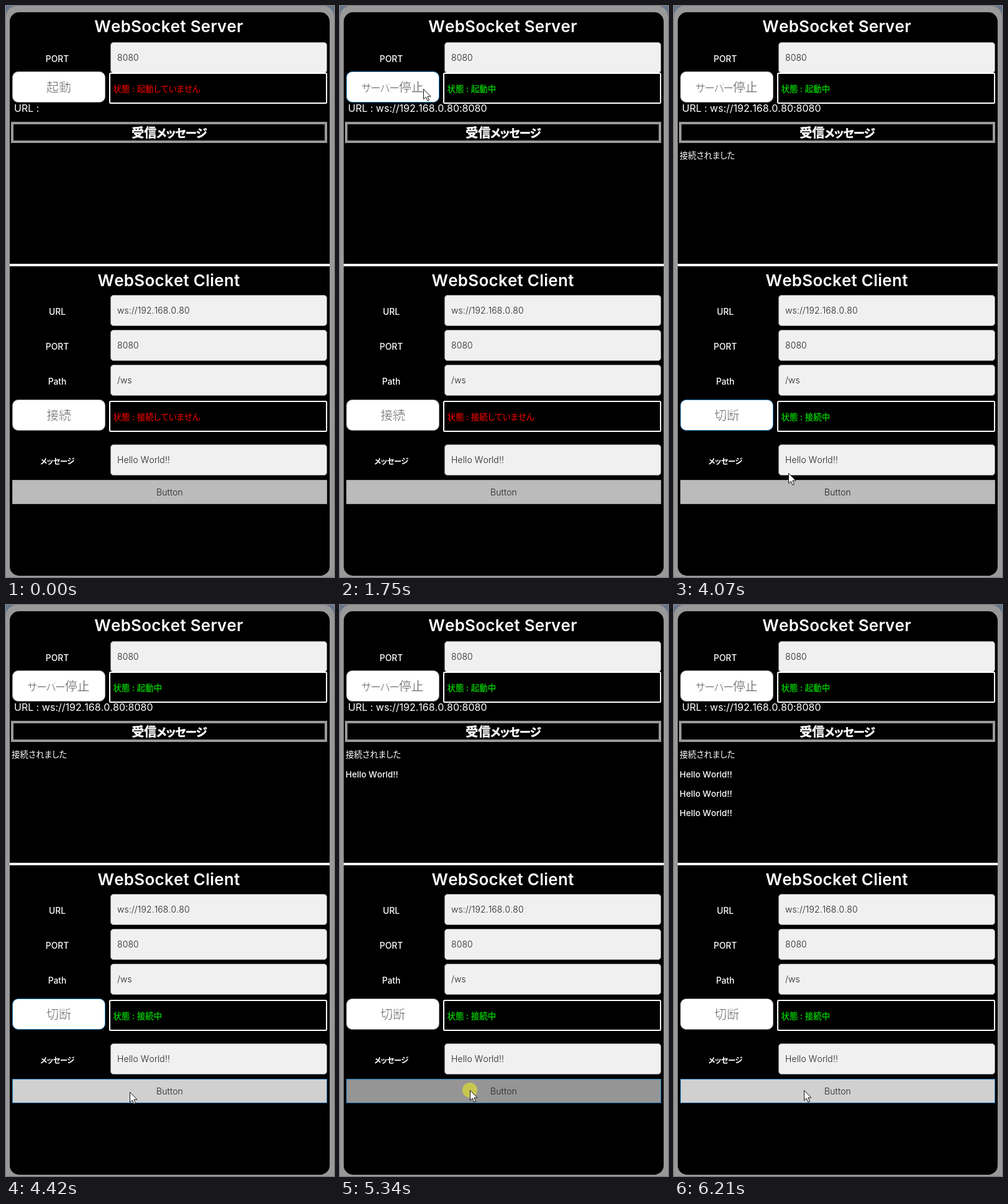
An HTML page that plays this animation: 528x917 px, repeating every 6.94 s.

```html
<!DOCTYPE html>
<html lang="ja">
<head>
<meta charset="utf-8">
<title>WebSocket demo</title>
<style>
html, body { margin: 0; width: 100%; height: 100%; overflow: hidden; background: #64748b; }
svg { display: block; width: 528px; height: 917px; }
text { font: 500 13.8px Inter, 'Noto Sans CJK JP', 'Noto Sans CJK', sans-serif; fill: #fff;
  font-kerning: none; font-variant-ligatures: none; white-space: pre; }
.mid { text-anchor: middle; }
.title { font-size: 26px; font-weight: 600; letter-spacing: .25px; }
.head { font-size: 20px; font-weight: 800; stroke: #fff; stroke-width: .5px; }
.big { font-size: 20px; font-weight: 200; fill: #444; stroke: #fff; stroke-width: .7px; }
.field { font-size: 14px; font-weight: 300; fill: #222; letter-spacing: .1px; }
.url { font-size: 16px; font-weight: 400; }
.log { font-size: 13.7px; }
.jp { font-size: 13.5px; font-weight: 400; }
.bold { font-size: 13.5px; font-weight: 700; }
.bad { font-size: 13.5px; fill: #d80000; }
.good { font-size: 13.5px; fill: #00d800; }
.bad, .good { stroke: currentColor; stroke-width: .25px; }
.bad { color: #d80000; }
.good { color: #00d800; }
.hira, .kata { font-feature-settings: 'palt'; }
.kata { font-size: .92em; letter-spacing: -.05em; }
.big .kata { font-size: .85em; letter-spacing: -1.3px; }
</style>
</head>
<body>
<svg id="stage" viewBox="0 0 528 917">
  <rect width="528" height="960" rx="17" fill="#999"/>
  <rect x="6" y="10" width="515" height="905" rx="15"/>
  <rect x="6" y="414" width="515" height="4" fill="#fff"/>
  <rect x="10" y="188" width="505" height="30" fill="none" stroke="#999" stroke-width="4"/>
  <g id="ui"></g>
  <circle id="halo" r="12" fill="#eaea21" opacity=".6"/>
  <path id="cursor" d="M0 0V16.2L3.8 12.7L6.4 18.8L9 17.7L6.4 11.7H11.4Z" fill="#fff" stroke="#111" stroke-width="1"/>
</svg>
<script>
const LOOP = 6940, BLUE = '#1f7fc0';
const $ = id => document.getElementById(id);
const ui = $('ui');
const timed = [];

function add(tag, attrs, html = '') {
  const el = document.createElementNS('http://www.w3.org/2000/svg', tag);
  for (const key in attrs) el.setAttribute(key, attrs[key]);
  el.innerHTML = html;
  return ui.appendChild(el);
}

// Text shown from one time up to another
function label(str, x, y, cls, from = 0, to = LOOP) {
  const html = str.replace(/[ぁ-ん]+|[ァ-ヶー]+/g,
    kana => `<tspan class="${kana < 'ァ' ? 'hira' : 'kata'}">${kana}</tspan>`);
  const el = add('text', { x, y, class: cls }, html);
  if (from > 0 || to < LOOP) timed.push({ el, from, to });
}

const box = (x, y, width, height, rx, fill, stroke = 'none', w = 1) =>
  add('rect', { x, y, width, height, rx, fill, stroke, 'stroke-width': w });

function field(y, value) {
  box(168.5, y + .5, 348, 49, 4.5, '#f0f0f0', '#888');
  label(value, 179, y + 30, 'field');
}

const button = y => box(10.5, y + .5, 149, 49, 9, '#fff', '#999');
const status = y => box(167, y, 349, 48, 1.5, '#000', '#fff', 2);

label('WebSocket Server', 262, 42, 'title mid');
label('PORT', 82.5, 90, 'mid');
field(58, '8080');
const serverButton = button(105);
label('起動', 85, 138, 'big mid', 0, 1750);
label('サーバー停止', 84.5, 138, 'big mid', 1750);
status(108);
label('状態 : 起動していません', 172.5, 137.5, 'bad', 0, 1750);
label('状態 : 起動中', 172.5, 137.5, 'good', 1750);
label('URL : ', 13, 170, 'url', 0, 1750);
label('URL : ws://192.168.0.80:8080', 13, 170, 'url', 1750);
label('受信メッセージ', 262.5, 211, 'head mid');
label('接続されました', 9, 245, 'jp', 3380);
[4680, 5470, 6210].forEach((from, i) => label('Hello World!!', 9, 276.5 + 31 * i, 'log', from));

label('WebSocket Client', 262, 450, 'title mid');
[['URL', 'ws://192.168.0.80'], ['PORT', '8080'], ['Path', '/ws']].forEach(([name, value], i) => {
  label(name, 82.5, 496 + 56 * i, 'mid');
  field(464 + 56 * i, value);
});
const clientButton = button(632);
label('接続', 85, 665, 'big mid', 0, 3380);
label('切断', 85, 665, 'big mid', 3380);
status(635);
label('状態 : 接続していません', 172.5, 664.5, 'bad', 0, 3380);
label('状態 : 接続中', 172.5, 664.5, 'good', 3380);
label('メッセージ', 82.5, 736, 'bold mid');
field(704, 'Hello World!!');
const sendButton = box(10.5, 761.5, 506, 38, 0, '#bbb', '#999');
label('Button', 263.5, 785.5, 'field mid');

// Pointer moves: first step, last step, step count, target x, target y, ease power
const MOVES = [
  [660, 800, 3, 225, 116, 2],
  [1000, 1420, 7, 134, 133, 2],
  [2290, 2980, 10, 98, 655, 1.6],
  [3790, 4070, 5, 184, 750, 1.3],
  [4140, 4420, 5, 199, 782, 1.6],
  [5140, 5210, 2, 209, 779, 1]
];
const CLICKS = [[1620, 1750], [3050, 3380], [4550, 4680], [5340, 5470], [6010, 6210]];
const within = (t, from, to) => t >= from && t < to;

function pointer(t) {
  let x = 867, y = 182;
  for (const [start, end, steps, tx, ty, power] of MOVES) {
    if (t < start) break;
    const step = Math.floor((t - start) / (end - start) * (steps - 1) + 1e-6) + 1;
    const k = 1 - (1 - Math.min(1, step / steps)) ** power;
    x += (tx - x) * k;
    y += (ty - y) * k;
  }
  return [x, y];
}

function render(t) {
  for (const { el, from, to } of timed) el.style.display = within(t, from, to) ? '' : 'none';

  const [x, y] = pointer(t);
  const pressed = CLICKS.some(([from, to]) => within(t, from, to));
  const over = top => x > 10 && x < 160 && y > top && y < top + 50;
  const sending = y > 761;

  $('cursor').setAttribute('transform', `translate(${x + .5} ${y + .5})`);
  $('cursor').style.display = t < 660 ? 'none' : '';
  $('halo').setAttribute('transform', `translate(${x} ${y})`);
  $('halo').style.display = pressed ? '' : 'none';

  const outline = (el, on) => el.setAttribute('stroke', on ? BLUE : '#999');
  outline(serverButton, over(105) || within(t, 1620, 3180));
  outline(clientButton, over(632) || within(t, 3180, 4550));
  outline(sendButton, sending);
  sendButton.setAttribute('fill', !sending ? '#bbb' : pressed ? '#959595' : '#d0d0d0');
}

function tick() {
  render(performance.now() % LOOP);
  requestAnimationFrame(tick);
}
tick();
</script>
</body>
</html>
```
